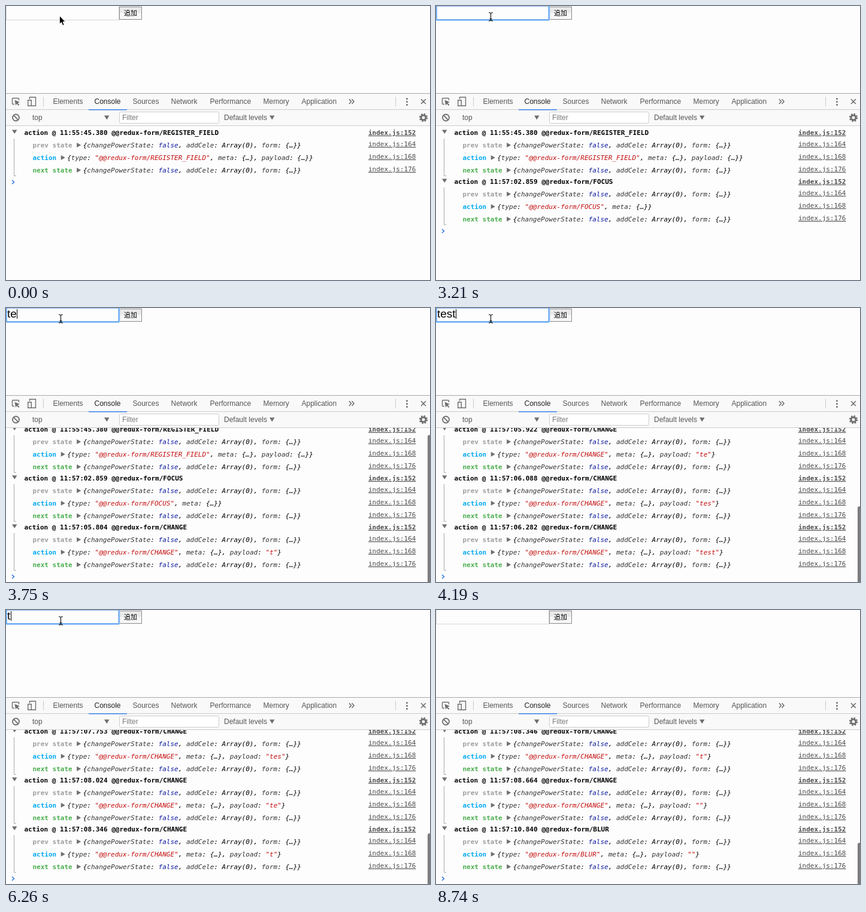
Recreate the animation shown at these times as an HTML page. Size 708 by 459 pixels, loop 8.84 s.

```html
<!DOCTYPE html>
<html lang="ja">
<head>
<meta charset="utf-8">
<style>
html, body { margin: 0; width: 100%; height: 100%; overflow: hidden; background: #fdfdfd; }
svg { display: block; }
text { white-space: pre; font: 12px "Liberation Sans", Arial, sans-serif; fill: #555; }
#log text { font: 11px "DejaVu Sans Mono", monospace; }
#log .bold { font-weight: bold; }
#log .obj { font-style: italic; fill: #000; }
#log .link { text-decoration: underline; fill: #4c4c4c; }
.key { fill: #333; }
.str { fill: #c40d0d; }
.bool { fill: #0a1a9c; }
.icon { fill: none; stroke: #6e6e6e; stroke-width: 1.4; }
.solid { fill: #6e6e6e; }
</style>
</head>
<body>
<svg width="708" height="459" viewBox="0 0 708 459">
  <defs>
    <clipPath id="view"><rect y="201" width="708" height="258"/></clipPath>
    <linearGradient id="face" x2="0" y2="1">
      <stop offset=".45" stop-color="#e9e9e9"/><stop offset=".5" stop-color="#f7f7f7"/>
    </linearGradient>
  </defs>

  <!-- page form -->
  <path id="plain" d="M.5 0V23.5H188.5V0" fill="none" stroke="#d6d6d6"/>
  <rect x="189.5" y="1.5" width="37" height="21" fill="url(#face)" stroke="#8a8a8a"/>
  <text x="197" y="16" style="font:11px 'Noto Sans CJK JP','Noto Sans CJK',sans-serif;fill:#000">追加</text>
  <g id="ring" fill="none">
    <rect x=".5" y="-.5" width="188.5" height="24" rx="2" stroke="#a9cdf8" stroke-width="3"/>
    <rect x=".5" y="-.5" width="188" height="23.5" rx="1" stroke="#6cacf3" stroke-width="2"/>
  </g>
  <text id="typed" x="2" y="16" style="font-size:19px;fill:#000"></text>
  <rect id="caret" y="2" width="1" height="16"/>

  <!-- tool bars -->
  <rect y="146" width="708" height="55" fill="#f9f9f9"/>
  <path d="M0 146.5H708" stroke="#a8a8a8"/>
  <path d="M0 173.5H708M0 200.5H708M62.5 152v16M650.5 152v16" stroke="#ccc"/>
  <rect x="138" y="173" width="64" height="1.5" fill="#3b7de9"/>
  <g class="icon">
    <path d="M14 164.5H11.5Q10.5 164.5 10.5 163.5V155.5Q10.5 154.5 11.5 154.5H20.5Q21.5 154.5 21.5 155.5V158"/>
    <path d="M39.5 156V152.7H49.5V167.3H43M36.7 157.7h5.6v9.6h-5.6z"/>
    <path d="M573 156l3.5 4-3.5 4M577.5 156l3.5 4-3.5 4M693 156l8 8M701 156l-8 8" stroke-width="1.6"/>
    <circle cx="16.5" cy="187" r="5.5" stroke-width="1.8"/>
    <path d="M12.7 183.2l7.6 7.6" stroke-width="1.8"/>
    <circle cx="697" cy="187" r="4" stroke-width="3"/>
    <circle cx="697" cy="187" r="6.2" stroke-width="2" stroke-dasharray="2.435"/>
  </g>
  <path class="solid" d="M14.5 157.5l8.5 3.5-3.5 1.5 3 3.3-1.5 1.2-3-3.3-1.8 3z"/>
  <g class="solid">
    <circle cx="669.5" cy="155.5" r="1.5"/><circle cx="669.5" cy="160.5" r="1.5"/><circle cx="669.5" cy="165.5" r="1.5"/>
    <path d="M164 183.5h8.5l-4.2 7zM440 183.5h8.5l-4.2 7z"/>
  </g>
  <g id="tabs"></g>
  <text x="44" y="191">top</text>
  <rect x="189.5" y="177.5" width="166" height="19" rx="2" fill="#fff" stroke="#ccc"/>
  <text x="194" y="191" style="fill:#777">Filter</text>
  <text x="364" y="191">Default levels</text>

  <!-- console -->
  <g clip-path="url(#view)">
    <g id="log"></g>
    <path id="prompt" d="M10 -3.2l3.5 3.2-3.5 3.2" fill="none" stroke="#3b7de9" stroke-width="1.6"/>
    <path id="bar" fill="#7d7d7d"/>
  </g>

  <path id="arrow" d="M0 0V13.5L3 10.8 5.2 16 7.6 15 5.4 10H9.5Z" stroke="#fff" stroke-width=".8"/>
  <path id="beam" d="M-3.5 -7Q0 -7 0 -5V5Q0 7 -3.5 7M3.5 -7Q0 -7 0 -5M0 5Q0 7 3.5 7M-2 3.5H2" fill="none" stroke="#111" stroke-width="1.2"/>
</svg>

<script>
const LOOP = 8840;
const CHAR = 6.62, GROUP = 82;
const $ = id => document.getElementById(id);

const tabs = [['Elements', 78.5], ['Console', 147.5], ['Sources', 211.5], ['Network', 275.5],
  ['Performance', 340.5], ['Memory', 429.5], ['Application', 493.5]];
$('tabs').innerHTML = tabs.map(([name, x]) =>
  `<text x="${x}" y="164"${name === 'Console' ? ' style="fill:#222"' : ''}>${name}</text>`).join('');

// Console entries: time, action type, payload
const entries = [
  ['55:45.380', 'REGISTER_FIELD', '{…}'], ['57:02.859', 'FOCUS'],
  ['57:05.804', 'CHANGE', '"t"'], ['57:05.922', 'CHANGE', '"te"'],
  ['57:06.088', 'CHANGE', '"tes"'], ['57:06.282', 'CHANGE', '"test"'],
  ['57:07.753', 'CHANGE', '"tes"'], ['57:08.024', 'CHANGE', '"te"'],
  ['57:08.346', 'CHANGE', '"t"'], ['57:08.664', 'CHANGE', '""'],
  ['57:10.840', 'BLUR', '""']
];
const state = '{changePowerState: false, addCele: Array(0), form: {…}}';

const paint = s => s.replace(/("[^"]*")|\b(false)\b|(\w+)(?=:)/g, (m, str, bool) =>
  `<tspan class="${str ? 'str' : bool ? 'bool' : 'key'}">${m}</tspan>`);

const link = (y, line, cls = '') =>
  `<text class="link ${cls}" x="605" y="${y}">index.js:${line}</text>`;

function row(y, label, color, obj, line) {
  const x = 44.5 + label.length * CHAR;
  return `<text class="bold" x="44.5" y="${y}" style="fill:${color}">${label}</text>
    <path class="solid" d="M${x + 7.5} ${y - 8}v8l7-4z"/>
    <text class="obj" x="${x + 18}" y="${y}">${paint(obj)}</text>${link(y - 2, line)}`;
}

$('log').innerHTML = entries.map(([time, type, payload]) => {
  const name = '@@redux-form/' + type;
  const action = `{type: "${name}", meta: {…}${payload ? ', payload: ' + payload : ''}}`;
  return `<g><path class="solid" d="M10 207.5h8.5l-4.2 6.5z"/>
    <text class="bold" x="30.5" y="216" style="fill:#000">action @ 11:${time} ${name}</text>
    ${link(216, 152, 'bold')}
    ${row(237, 'prev state', '#9e9e9e', state, 164)}
    ${row(258, 'action', '#03a9f4', action, 168)}
    ${row(279, 'next state', '#4caf50', state, 176)}
    <path d="M13.5 222V284.5H17" fill="none" stroke="#aaa"/></g>`;
}).join('');
const groups = [...$('log').children];

// Step tracks: [start, value]
const typed = [[0, ''], [3660, 't'], [3750, 'te'], [3930, 'tes'], [4110, 'test'],
  [5630, 'tes'], [5900, 'te'], [6170, 't'], [6530, '']];
const logSteps = [0, 800, 3660, 3840, 3930, 4190, 5630, 5900, 6260, 6620, 8740];
const blinks = [710, 1250, 1790, 2230, 2770, 3210, 3660, 4640, 5180, 6620, 7150, 7590, 8130, 8580];
const barFade = [[0, 0], [3660, 1], [4640, .6], [4730, .3], [4820, 0], [5630, 1], [6620, 0], [8740, 1]];
const pointer = [[0, ['arrow', 89.5, 16.5]], [710, ['beam', 90, 16.5]], [1960, ['beam', 91, 17]],
  [2050, ['beam', 91.5, 18]], [6980, ['arrow', 140, 60]], [7060, ['arrow', 240, 145]],
  [7150, ['arrow', 329, 222]], [7320, ['arrow', 420, 300]], [7410, ['arrow', 510, 375]],
  [7500, ['arrow', 587, 443]], [7590, ['none', 0, 0]]];
const caretX = [2, 8, 18, 27, 33];

const at = (track, t) => track.filter(s => s[0] <= t).pop()[1];
const count = (times, t) => times.filter(s => s <= t).length;
const show = (el, on) => el.setAttribute('visibility', on ? 'visible' : 'hidden');
const move = (el, x, y) => el.setAttribute('transform', `translate(${x} ${y})`);

function draw(t) {
  const focus = t >= 710 && t < 8740;
  show($('ring'), focus);
  show($('plain'), !focus);

  const text = at(typed, t);
  $('typed').textContent = text;
  $('caret').setAttribute('x', caretX[text.length]);
  show($('caret'), focus && count(blinks, t) % 2);

  const n = count(logSteps, t);
  const scroll = n > 2 ? GROUP * (n - 2) - 73 : 0;
  groups.forEach((g, i) => {
    show(g, i < n);
    move(g, 0, GROUP * i - scroll);
  });
  move($('prompt'), 0, 213 + GROUP * n - scroll);

  const top = 462 - 258 * 258 / (258 + scroll);
  $('bar').setAttribute('d', `M704 459V${top + 3}q0 -3 3 -3h1V459z`);
  $('bar').setAttribute('opacity', at(barFade, t));

  const [shape, x, y] = at(pointer, t);
  for (const id of ['arrow', 'beam']) {
    show($(id), id === shape);
    move($(id), x, y);
  }
}

const start = performance.now();
function tick() {
  draw((performance.now() - start) % LOOP);
  requestAnimationFrame(tick);
}
tick();
</script>
</body>
</html>
```
